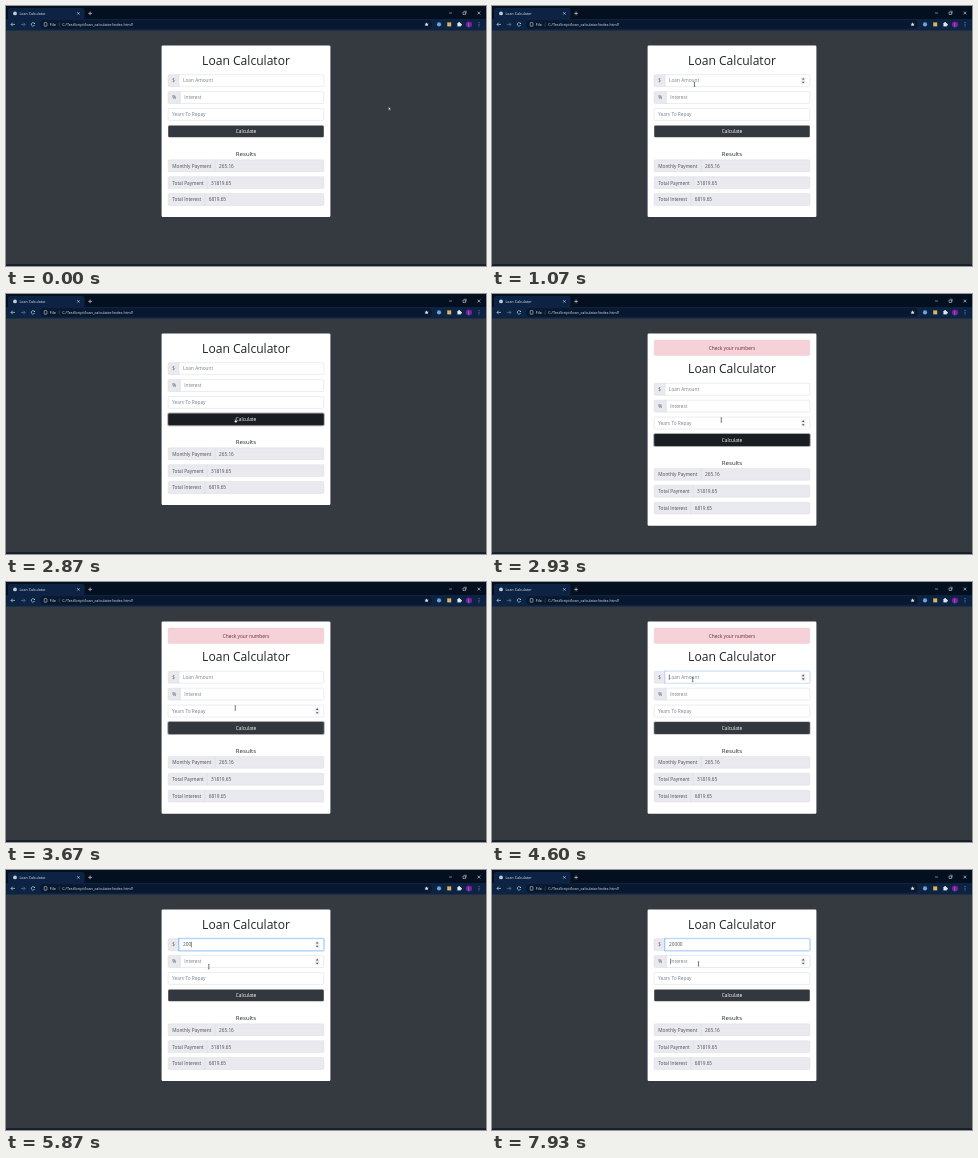
An HTML page with a canvas for the animation above (8000 ms loop, 480 by 260 pixels).

```html
<!DOCTYPE html>
<html lang="en">
<head>
<meta charset="utf-8">
<title>Loan Calculator</title>
<style>
html, body { margin: 0; width: 100%; height: 100%; overflow: hidden; background: #343a40; }
canvas { display: block; width: 100vw; height: 100vh; }
</style>
</head>
<body>
<canvas id="stage"></canvas>
<script>
const W = 480, H = 260, LOOP = 8000;
const canvas = document.getElementById('stage');
const ctx = canvas.getContext('2d');
const dpr = window.devicePixelRatio || 1;
canvas.width = W * dpr;
canvas.height = H * dpr;

const LEFT = 162.2, RIGHT = 317.8, FIELD_H = 11.9, STEP = 16.9;
const ROW = i => 68.7 + STEP * i;
const PRESS = 2730, RELEASE = 2925, ALERT_END = 5800;
const FOCUS_LOAN = 4530, FOCUS_RATE = 7900;
const KEYS = [5530, 5600, 5800, 6070, 6270];
const AMOUNT = '20000';

// Pointer stops: time, x, y
const PATH = [
  [0, 382.5, 100.5], [70, 382.5, 100.5], [330, 352, 132], [470, 352, 132],
  [1010, 201.8, 78.4], [1070, 202.5, 78.4], [1270, 204, 78.5], [1330, 204, 78.5],
  [1470, 204.8, 78.7], [1670, 204.8, 78.7], [2470, 229.3, 126], [3670, 229.3, 126],
  [3930, 195, 86], [4070, 195, 86], [4530, 200.7, 97.5], [4620, 200.7, 97.5],
  [4800, 202.8, 96.7], [7270, 202.8, 96.7], [7340, 203.8, 96.2], [7470, 203.8, 96.2],
  [7540, 205.8, 94.4], [7670, 205.8, 94.4], [7740, 206.5, 93.9], [8000, 206.5, 93.9]
];

const clamp = v => Math.max(0, Math.min(1, v));
const ease = v => v * v * (3 - 2 * v);
const fade = (t, start) => ease(clamp((t - start) / 150));
const mix = (a, b, k) => a.map((v, i) => v + (b[i] - v) * k);
const rgb = c => `rgb(${c.map(Math.round).join(',')})`;

function pointerAt(t) {
  let i = 1;
  while (i < PATH.length - 1 && PATH[i][0] < t) i++;
  const [t0, x0, y0] = PATH[i - 1], [t1, x1, y1] = PATH[i];
  const k = ease(clamp((t - t0) / (t1 - t0)));
  return { x: x0 + (x1 - x0) * k, y: y0 + (y1 - y0) * k };
}

function text(str, x, y, size, color, align = 'left', weight = 400) {
  ctx.font = `${weight} ${size}px "Open Sans", "Noto Sans", sans-serif`;
  ctx.textAlign = align;
  ctx.fillStyle = color;
  ctx.fillText(str, x, y);
}

function rect(x, y, w, h, color) {
  ctx.fillStyle = color;
  ctx.fillRect(x, y, w, h);
}

function box(x, y, w, h, r, fill, stroke, lw = 0.4) {
  ctx.beginPath();
  ctx.roundRect(x, y, w, h, r);
  if (fill) { ctx.fillStyle = fill; ctx.fill(); }
  if (stroke) { ctx.strokeStyle = stroke; ctx.lineWidth = lw; ctx.stroke(); }
}

function disc(x, y, r, color) {
  ctx.beginPath();
  ctx.arc(x, y, r, 0, Math.PI * 2);
  ctx.fillStyle = color;
  ctx.fill();
}

function line(points, color, lw = 0.6) {
  ctx.beginPath();
  points.forEach(([x, y]) => ctx.lineTo(x, y));
  ctx.strokeStyle = color;
  ctx.lineWidth = lw;
  ctx.stroke();
}

function poly(points, fill, stroke) {
  ctx.beginPath();
  points.forEach(([x, y]) => ctx.lineTo(x, y));
  ctx.closePath();
  ctx.fillStyle = fill;
  ctx.fill();
  if (stroke) { ctx.strokeStyle = stroke; ctx.lineWidth = 0.4; ctx.stroke(); }
}

function cross(x, y, r, color) {
  line([[x - r, y - r], [x + r, y + r]], color);
  line([[x - r, y + r], [x + r, y - r]], color);
}

function drawBrowser() {
  const ink = '#e4e9f2';
  rect(0, 0, W, 14, '#04101f');
  box(2, 2, 76.5, 14, 2, '#0c2344');
  rect(0, 13, W, 11.4, '#0c2344');
  disc(9, 7.4, 1.9, '#c3cbd8');
  text('Loan Calculator', 13.5, 8.8, 3.6, ink);
  cross(72.4, 7.4, 1.2, ink);
  line([[82.2, 7.4], [86, 7.4]], ink);
  line([[84.1, 5.5], [84.1, 9.3]], ink);
  line([[443, 7], [446, 7]], ink, 0.5);
  box(457, 6, 2.5, 2.5, 0, null, ink, 0.5);
  line([[458, 5.2], [460.3, 5.2], [460.3, 7.6]], ink, 0.4);
  cross(472.9, 7, 1.4, ink);

  for (const [x, dir, color] of [[7, -1, ink], [17, 1, '#7b8799']]) {
    line([[x - 2, 18.4], [x + 2, 18.4]], color);
    line([[x + dir * 0.3, 16.6], [x + dir * 2, 18.4], [x + dir * 0.3, 20.2]], color);
  }
  ctx.beginPath();
  ctx.arc(27, 18.4, 1.7, 0.4, 5.5);
  ctx.strokeStyle = ink;
  ctx.lineWidth = 0.6;
  ctx.stroke();
  poly([[27.6, 17.9], [29, 17.9], [29, 16.4]], ink);

  box(34, 14.2, 392, 8.5, 4.2, '#08182f');
  box(38.2, 16.6, 2.7, 3.6, 0.3, null, ink, 0.5);
  text('File', 43.7, 20, 3.9, ink);
  line([[53.2, 16.4], [53.2, 20.4]], '#65738a', 0.4);
  text('C:/TestScript/loan_calculator/index.html?', 56.2, 20, 3.75, ink);

  const star = [];
  for (let i = 0; i < 10; i++) {
    const a = i * Math.PI / 5 - Math.PI / 2, r = i % 2 ? 1 : 2.3;
    star.push([420.6 + r * Math.cos(a), 18.5 + r * Math.sin(a)]);
  }
  poly(star, ink);
  disc(433, 18.4, 2.1, '#6fa3d8');
  rect(441.2, 16.4, 4, 4, '#d8b45c');
  rect(451.4, 17, 3.4, 3.4, ink);
  disc(453.1, 16.8, 0.9, ink);
  disc(455, 18.7, 0.9, ink);
  disc(463, 18.4, 3, '#7b1fa2');
  text('J', 463, 19.5, 3, '#fff', 'center');
  for (const y of [16.8, 18.4, 20]) disc(473, y, 0.45, ink);
  rect(0, 24, W, 0.5, '#1b2b42');
  rect(0, 258.2, W, 1.8, '#141d2b');
}

function drawSpinner(y) {
  const x = 311.2, c = y + FIELD_H / 2;
  rect(x - 2.3, c - 3.7, 4.6, 7.4, '#f0f0f2');
  poly([[x - 1.4, c - 1.1], [x + 1.4, c - 1.1], [x, c - 2.7]], '#4a4d52');
  poly([[x - 1.4, c + 1.1], [x + 1.4, c + 1.1], [x, c + 2.7]], '#4a4d52');
}

function drawField(f, y) {
  const x = f.x;
  if (f.sign) {
    box(LEFT, y, x - LEFT + 0.5, FIELD_H, [1.25, 0, 0, 1.25], '#e9e9ef', '#ced2da');
    text(f.sign, (LEFT + x) / 2, y + 7.7, 4.8, '#495057', 'center');
  }
  const r = f.sign ? [0, 1.25, 1.25, 0] : 1.25;
  if (f.glow > 0) {
    box(x - 0.5, y - 0.5, RIGHT - x + 1, FIELD_H + 1, r, null, `rgba(0,123,255,${0.25 * f.glow})`, 1);
  }
  box(x, y, RIGHT - x, FIELD_H, r, '#fff', rgb(mix([206, 210, 218], [128, 189, 255], f.glow)), 0.4 + 0.2 * f.glow);
  text(f.value || f.hint, x + 3.9, y + 7.7, 4.8, f.value ? '#495057' : '#7a828a');
  if (f.caret) {
    const w = f.value ? ctx.measureText(f.value).width : 0;
    rect(x + 3.9 + w, y + 3, 0.5, 5.8, '#30353a');
  }
  if (f.spin) drawSpinner(y);
}

function drawButton(t, y) {
  const hover = fade(t, 2270) - fade(t, RELEASE);
  const press = fade(t, PRESS) - fade(t, RELEASE);
  const ring = fade(t, PRESS) - fade(t, FOCUS_LOAN);
  const color = mix(mix([50, 56, 62], [35, 39, 43], hover), [26, 29, 34], press);
  if (ring > 0) box(LEFT - 1, y - 1, RIGHT - LEFT + 2, FIELD_H + 2, 2, `rgba(82,88,93,${0.5 * ring})`);
  box(LEFT, y, RIGHT - LEFT, FIELD_H, 1.25, rgb(color));
  text('Calculate', 240, y + 7.8, 4.8, '#fff', 'center');
}

function drawResult(label, value, split, y) {
  box(LEFT, y, RIGHT - LEFT, FIELD_H, 1.25, '#e9e9ef', '#d2d5dc');
  line([[split, y], [split, y + FIELD_H]], '#d6d8df', 0.4);
  text(label, 166.2, y + 7.8, 4.78, '#495057');
  text(value, split + 3.9, y + 7.8, 4.7, '#495057');
}

function drawPointer(p, kind) {
  const at = pts => pts.map(([dx, dy]) => [p.x + dx, p.y + dy]);
  if (kind === 'beam') {
    line(at([[0, -2.1], [0, 2.1]]), '#222', 0.6);
    line(at([[-0.9, -2.2], [0.9, -2.2]]), '#222', 0.4);
    line(at([[-0.9, 2.2], [0.9, 2.2]]), '#222', 0.4);
  } else if (kind === 'hand') {
    poly(at([[-0.4, -1.2], [0.3, -1.2], [0.3, 0.3], [1.9, 0.7], [1.7, 2.6], [-0.3, 2.6], [-1.4, 1], [-0.4, 1.1]]), '#fff', '#222');
  } else {
    poly(at([[0, 0], [0, 3.9], [0.9, 3.1], [1.5, 4.4], [2.1, 4.1], [1.6, 2.9], [2.8, 2.8]]), '#fff', '#111');
  }
}

function draw(t) {
  ctx.setTransform(canvas.width / W, 0, 0, canvas.height / H, 0, 0);
  rect(0, 0, W, H, '#343a40');
  drawBrowser();

  const alert = t >= RELEASE && t < ALERT_END;
  const dy = alert ? 20.6 : 0;
  const p = pointerAt(t);
  const over = i => p.x > LEFT && p.x < RIGHT && p.y > ROW(i) + dy && p.y < ROW(i) + dy + FIELD_H;

  box(155.6, 39.5, 168.8, 171.6 + dy, 1.25, '#fff');
  if (alert) {
    box(LEFT, 46, RIGHT - LEFT, 15.6, 1.25, '#f4d2d8', '#efc4cb');
    text('Check your numbers', 240, 55.6, 4.8, '#6b2a36', 'center');
  }
  text('Loan Calculator', 240, 58.6 + dy, 12.1, '#212529', 'center', 500);

  const typed = KEYS.filter(k => t >= k).length;
  const lastKey = typed ? KEYS[typed - 1] : FOCUS_LOAN;
  const onLoan = t >= FOCUS_LOAN && t < FOCUS_RATE;
  const onRate = t >= FOCUS_RATE;
  const fields = [
    { x: 173, sign: '$', hint: 'Loan Amount', value: AMOUNT.slice(0, typed),
      glow: fade(t, FOCUS_LOAN) - fade(t, FOCUS_RATE), spin: onLoan || over(0),
      caret: onLoan && (t - lastKey) % 1000 < 500 },
    { x: 174.3, sign: '%', hint: 'Interest', glow: fade(t, FOCUS_RATE), spin: onRate || over(1), caret: onRate },
    { x: LEFT, hint: 'Years To Repay', glow: 0, spin: over(2) }
  ];
  fields.forEach((f, i) => drawField(f, ROW(i) + dy));
  drawButton(t, ROW(3) + dy);

  text('Results', 240, 150.1 + dy, 6.05, '#212529', 'center', 500);
  drawResult('Monthly Payment', '265.16', 209.2, ROW(5) + 0.6 + dy);
  drawResult('Total Payment', '31819.65', 201.2, ROW(6) + 0.6 + dy);
  drawResult('Total Interest', '6819.65', 198.8, ROW(7) + 0.6 + dy);

  const onTitle = p.x > 190 && p.x < 290 && p.y > 46 + dy && p.y < 63 + dy;
  const kind = over(3) ? 'hand' : over(0) || over(1) || over(2) || onTitle ? 'beam' : 'arrow';
  drawPointer(p, kind);
}

const start = performance.now();
function tick() {
  draw((performance.now() - start) % LOOP);
  requestAnimationFrame(tick);
}
tick();
</script>
</body>
</html>
```
